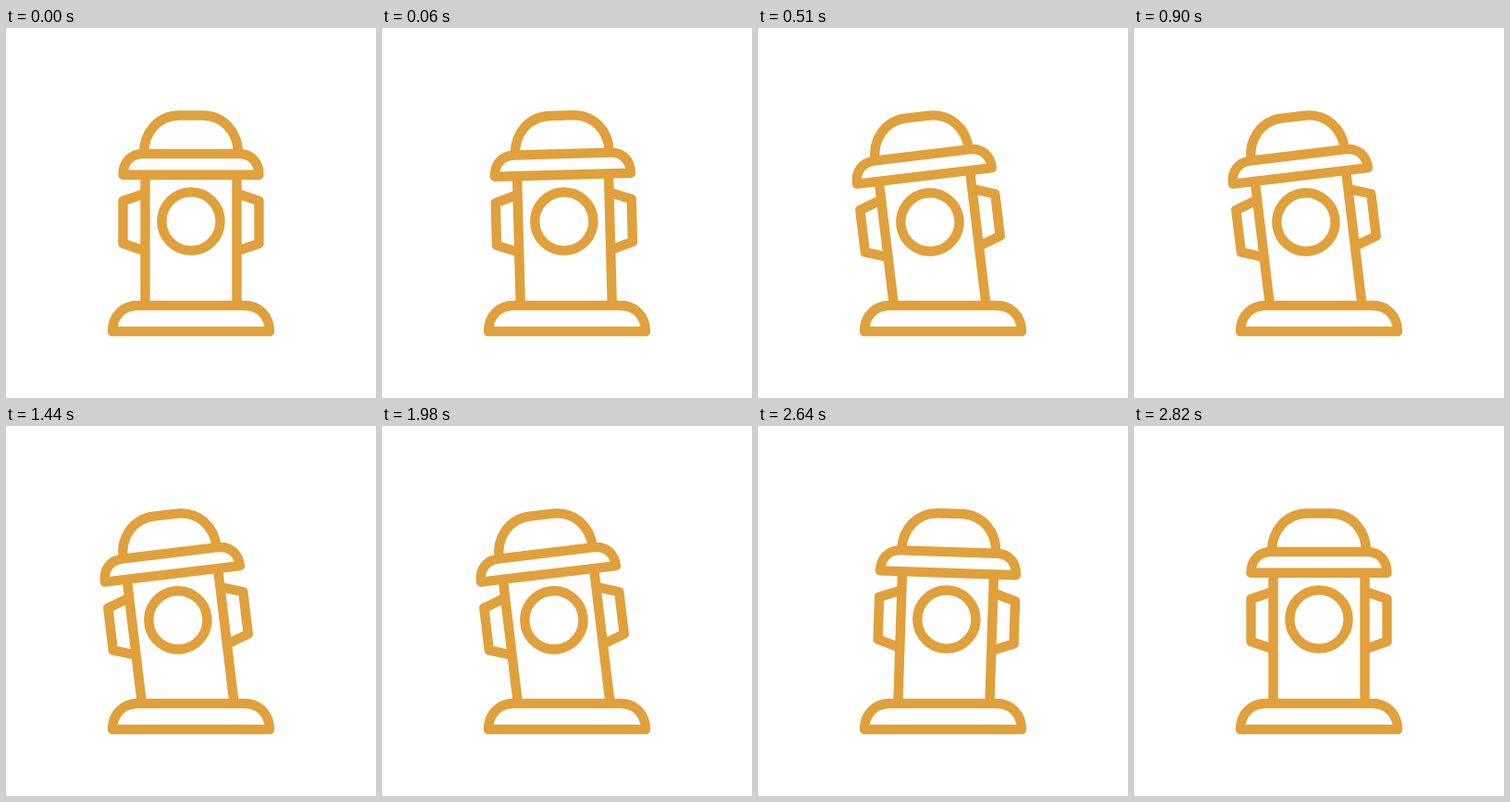
Recreate the animation shown at these times as an HTML page. Size 400x400 px, loop 4130 ms.

```html
<!DOCTYPE html>
<html lang="en">
<head>
<meta charset="utf-8">
<title>Hydrant</title>
<style>
  html, body { margin: 0; height: 100%; overflow: hidden; background: #fff; }
  svg { display: block; width: 100%; height: 100%; }
  .line { fill: none; stroke: #e0a03c; stroke-width: 10.4; stroke-linejoin: round; }
  .base, #drop { fill: #fff; }
</style>
</head>
<body>
<svg viewBox="0 0 400 400">
  <g id="hydrant" class="line">
    <path d="M150 179L126.5 187V233L150 241M250 179L273.5 187V233L250 241"/>
    <path d="M150.5 159V304M249.5 159V304"/>
    <circle cx="200" cy="209" r="31.6"/>
    <path d="M149 136C149 112 165 95 187 94.5H213C235 95 251 112 251 136"/>
    <path d="M126.5 158.7C126.5 145 135 136 148 136H252C265 136 273.5 145 273.5 158.7Z"/>
  </g>
  <path class="line base" d="M115 328C115 312 126 300 142 300H258C274 300 285 312 285 328Z"/>
  <circle id="drop" cx="275" r="0"/>
</svg>
<script>
  const LOOP = 4130, STEP = 30;
  const DROP_PERIOD = 270, DROP_START = 270, DROP_END = 2820;

  // [time in ms, tilt in degrees]
  const tilts = [[0, 0], [205, -7.8], [370, -6.85], [2460, -6.85], [2660, 2.1], [2820, 0], [LOOP, 0]];

  const hydrant = document.getElementById('hydrant');
  const drop = document.getElementById('drop');
  const ease = p => (1 - Math.cos(Math.PI * p)) / 2;

  function tiltAt(t) {
    const i = tilts.findIndex(([time]) => time > t);
    const [t0, a] = tilts[i - 1], [t1, b] = tilts[i];
    return a + (b - a) * ease((t - t0) / (t1 - t0));
  }

  // White drops fall past the right shoulder of the base.
  function drawDrop(t) {
    const phase = t % DROP_PERIOD;
    const visible = t >= DROP_START && t < DROP_END && phase < 90;
    drop.setAttribute('cy', 275 + phase * 22 / 60);
    drop.setAttribute('r', visible ? 12 * Math.min(1, (90 - phase) / 30) : 0);
  }

  const start = performance.now();
  function draw() {
    const elapsed = (performance.now() - start) % LOOP;
    const t = Math.floor(elapsed / STEP) * STEP;
    hydrant.setAttribute('transform', `rotate(${tiltAt(t)} 200 327)`);
    drawDrop(t);
    requestAnimationFrame(draw);
  }
  draw();
</script>
</body>
</html>
```
